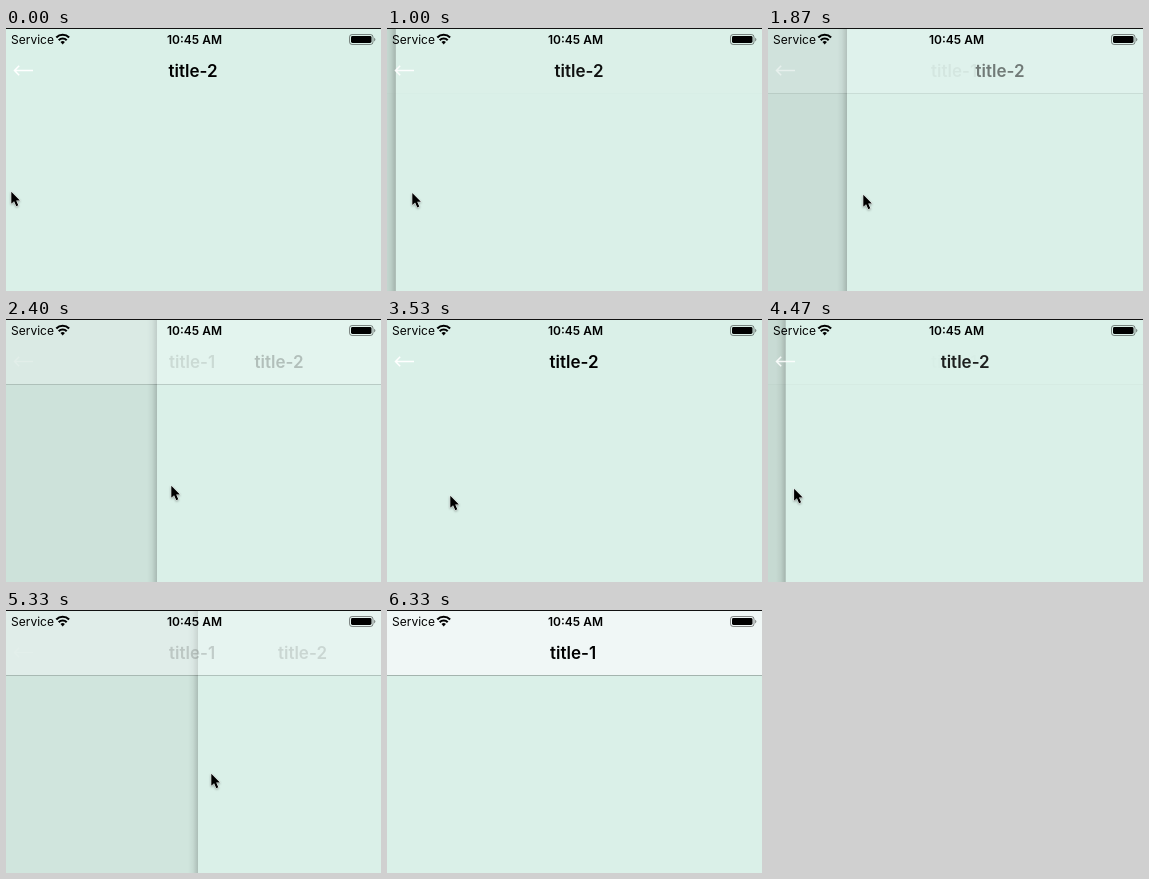
Write an HTML page that moves like this. It is 375 px wide and 263 px high and loops after 6.94 s.

```html
<!DOCTYPE html>
<html lang="en">
<head>
<meta charset="utf-8">
<title>Swipe back</title>
<style>
html, body { margin: 0; width: 100%; height: 100%; overflow: hidden; background: #daf0e8; }
svg { display: block; width: 375px; height: 263px; font-family: Inter, Roboto, sans-serif; }
.title { font-size: 17px; font-weight: 600; }
.status { font-size: 12px; }
</style>
</head>
<body>
<svg viewBox="0 0 375 263">
  <defs>
    <linearGradient id="shade">
      <stop offset="0" stop-opacity="0"/>
      <stop offset=".5" stop-opacity=".05"/>
      <stop offset="1" stop-opacity=".18"/>
    </linearGradient>
  </defs>
  <rect width="375" height="263" fill="#daf0e8"/>
  <rect id="dim" width="375" height="263"/>
  <g id="page">
    <rect id="shadow" x="-10" width="10" height="263" fill="url(#shade)"/>
    <rect width="375" height="263" fill="#daf0e8"/>
  </g>
  <rect id="bar" width="375" height="65" fill="#f8fafb"/>
  <rect id="line" y="65" width="375" height="1"/>

  <path id="back" d="M27 42.5H8.5M13.2 37.8L8.5 42.5L13.2 47.2" fill="none" stroke="#fff" stroke-width="1.5"/>
  <text id="prev" class="title" x="163" y="49">title-1</text>
  <text id="next" class="title" x="162.5" y="49">title-2</text>

  <text class="status" x="5" y="16">Service</text>
  <g fill="none" stroke="#000" stroke-width="2.1">
    <path d="M50.3 9.4A9 9 0 0 1 63.1 9.4"/>
    <path d="M52.7 12.2A5.6 5.6 0 0 1 60.7 12.2"/>
  </g>
  <path d="M56.7 16.4L54.5 14.1A3.1 3.1 0 0 1 58.9 14.1Z"/>
  <text class="status" x="188.5" y="16" text-anchor="middle" font-weight="600">10:45 AM</text>
  <rect x="343.5" y="6.5" width="23.5" height="10" rx="2.6" fill="none" stroke="#000" stroke-opacity=".45"/>
  <rect x="345" y="8" width="20.5" height="7" rx="1.4"/>
  <path d="M368.2 9.8a2 2 0 0 1 0 3.6z" fill-opacity=".5"/>
  <rect width="375" height="1" fill="#111"/>

  <path id="cursor" d="M.3 .8V12.8L3.1 10.2L5.3 15.2L7.3 14.3L5.2 9.4H8.9Z" stroke="#fff" paint-order="stroke" style="filter:drop-shadow(0 1px 1px #0005)"/>
</svg>
<script>
const LOOP = 6940, TICK = LOOP / 104, WIDTH = 375;

const linear = u => u;
const easeOut = u => 1 - (1 - u) ** 2;

// from tick, to tick, change of page edge, pointer x, pointer y, easing
const moves = [
  [3, 10, 4, 15, 1, linear],         // first short drag
  [14, 22, 39, 40, 2, linear],
  [24, 36, 108, 105, 0, linear],
  [46, 53, -151, -102, 10, easeOut], // let go, page returns
  [54, 63, 0, -58, -7, linear],
  [66, 71, 89, 104, 0, linear],      // second drag
  [71, 77, 97, 90, -6, linear],
  [77, 83, 12, 12, 0, linear],
  [86, 95, 177, 0, 112, easeOut]     // page leaves
];

const $ = id => document.getElementById(id);
const fade = (id, a) => $(id).setAttribute("opacity", a);
const shift = (id, x, y) => $(id).setAttribute("transform", `translate(${x} ${y})`);

function pose(tick) {
  let edge = 0, x = 5, y = 163;
  for (const [from, to, dEdge, dx, dy, ease] of moves) {
    const u = ease(Math.min(1, Math.max(0, (tick - from) / (to - from))));
    edge += dEdge * u;
    x += dx * u;
    y += dy * u;
  }
  return { edge, x, y };
}

function draw(ms) {
  const { edge, x, y } = pose(Math.round(ms % LOOP / TICK));
  const p = edge / WIDTH, rest = (1 - p) ** 3;
  shift("page", edge, 0);
  shift("next", edge * 0.57, 0);
  shift("cursor", x, y);
  fade("shadow", Math.min(1, 2 - 2 * p));
  fade("dim", 0.1 * (1 - p));
  fade("bar", 0.73 * p);
  fade("line", 0.25 * Math.min(1, p * 1.5));
  fade("next", rest);
  fade("back", rest);
  fade("prev", 0.2 * p + 0.8 * p ** 4);
}

const start = performance.now();
(function loop() {
  draw(performance.now() - start);
  requestAnimationFrame(loop);
})();
</script>
</body>
</html>
```
